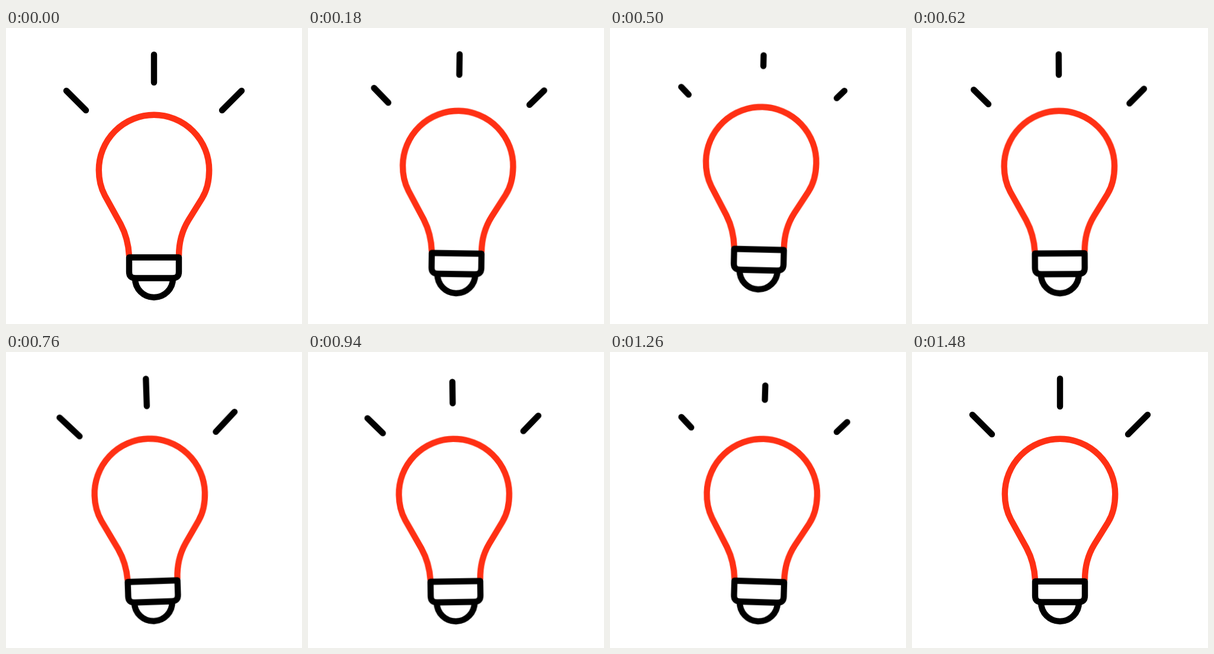
Write an HTML page that moves like this. It is 500 by 500 pixels and loops after 1500 ms.

```html
<!DOCTYPE html>
<html lang="en">
<head>
<meta charset="utf-8">
<title>Light bulb</title>
<style>
  html, body { margin: 0; width: 100%; height: 100%; overflow: hidden; background: #fff; }
  svg { display: block; width: 100%; height: 100%; }

  .icon { fill: none; stroke: #000; stroke-width: 10.4; stroke-linecap: round; stroke-linejoin: round; }
  .glass { stroke: #ff3014; stroke-linecap: butt; }

  .hop, .sway, .rays { animation: 1500ms cubic-bezier(.333, 0, .667, 1) infinite; }
  .hop { animation-name: hop; }
  .sway { animation-name: sway; transform-origin: 250px 460px; }
  .rays { animation-name: shrink; }

  @keyframes hop {
    0%, 53.333%, 100% { transform: translateY(0); }
    26.667% { transform: translateY(-16px); }
  }
  @keyframes sway {
    0%, 98.667%, 100% { transform: rotate(0deg); }
    26.667%, 80% { transform: rotate(2deg); }
    53.333% { transform: rotate(-2deg); }
  }
  /* each ray is two halves drawn outward from its middle */
  @keyframes shrink {
    0%, 53.333% { stroke-dasharray: 23.5px 99px; animation-timing-function: ease-in; }
    26.667%, 76% { stroke-dasharray: 0px 99px; animation-timing-function: ease-out; }
    98.667%, 100% { stroke-dasharray: 23.5px 99px; }
  }
</style>
</head>
<body>
<svg viewBox="0 0 500 500">
  <g class="icon hop">
    <g class="sway">
      <path class="glass" d="M208 385C207 365 202 347 193.500 331L167 283C160 270 156.800 255 156.800 240A93.200 93.200 0 0 1 343.200 240C343.200 258 339 275 331 288L308 325C297 343 292 363 292 385"/>
      <path d="M208 387.500H292V412Q292 422.500 281.500 422.500H218.500Q208 422.500 208 412Z"/>
      <path d="M218 423A32 32 0 0 0 282 423"/>
      <g class="rays">
        <path d="M250 68.500V45M250 68.500V92"/>
        <path d="M118.500 122.500L102 106M118.500 122.500L135 139"/>
        <path d="M381.500 122.500L398 106M381.500 122.500L365 139"/>
      </g>
    </g>
  </g>
</svg>
</body>
</html>
```
